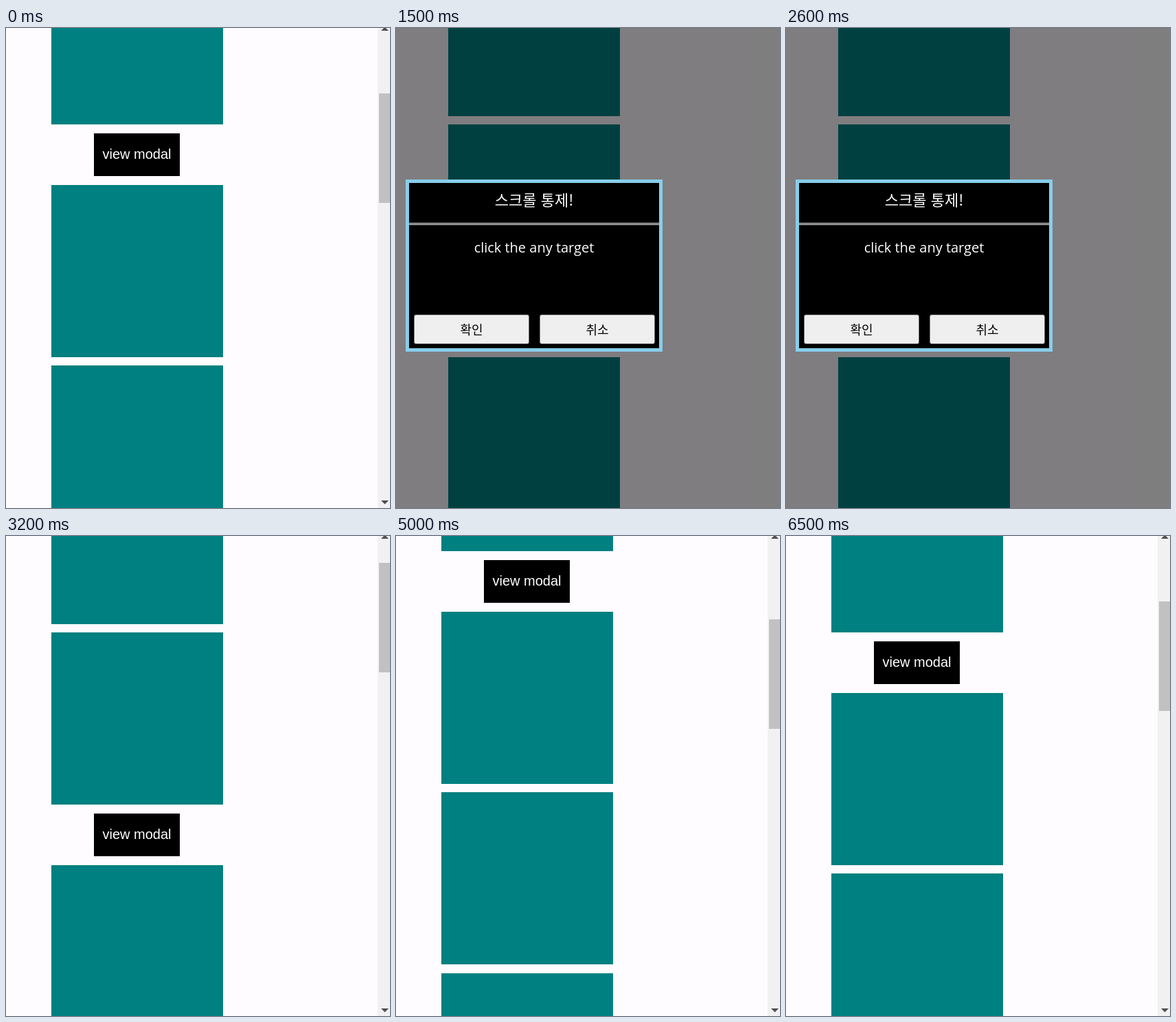
These frames come from a looping animation (559 px wide and 697 px high, 7.4 s). An HTML page:

```html
<!DOCTYPE html>
<html lang="ko">
<head>
<meta charset="utf-8">
<title>Modal scroll lock</title>
<style>
  html, body { margin: 0; width: 100%; height: 100%; overflow: hidden; background: #fffcff; }
  div { position: absolute; box-sizing: border-box; }
  #stage { left: 0; top: 0; width: 559px; height: 697px; overflow: hidden; background: #fffcff; }
  #page { left: 0; top: 0; }
  .box { left: 66px; width: 250px; height: 250px; background: #008080; }
  #open {
    left: 128px; top: 153px; width: 125px; height: 62px; background: #000; color: #fff;
    font: 20px/60px "Liberation Sans", Arial, sans-serif; text-align: center; white-space: nowrap;
  }
  .locked .box { left: 76px; }
  .locked #open { left: 139px; }

  #bar { left: 541px; top: 0; width: 18px; height: 697px; background: #f1f1f1; }
  #thumb { left: 2px; top: 0; width: 16px; height: 159px; background: #c1c1c1; }
  #bar svg { position: absolute; left: 0; top: 0; fill: #505050; }
  .locked #bar { display: none; }

  #overlay { inset: 0; background: rgba(0, 0, 0, .5); display: none; }
  .locked #overlay { display: block; }
  #modal {
    left: 14px; top: 220px; width: 374px; height: 250px;
    border: 5px solid #87ceeb; background: #000; color: #fff; text-align: center; white-space: nowrap;
  }
  #title {
    left: 0; top: 0; width: 364px; height: 61px; border-bottom: 3px double #fff;
    font: 22px/46px "Noto Sans CJK KR", "Noto Sans CJK", sans-serif;
  }
  #message { left: 0; top: 79px; width: 364px; font: 20px/30px "Open Sans", sans-serif; }
  .choice {
    top: 191px; width: 168px; height: 43px; border: 1px solid #767676; border-radius: 3px;
    background: #efefef; color: #000;
    font: 18px/41px "Noto Sans CJK KR", "Noto Sans CJK", sans-serif;
  }
  #ok { left: 7px; }
  #cancel { left: 190px; }
  .choice.hover { background: #e5e5e5; }
  .choice.active { background: #f5f5f5; }
</style>
</head>
<body>
<div id="stage">
  <div id="page"><div id="open">view modal</div></div>
  <div id="bar">
    <div id="thumb"></div>
    <svg width="18" height="697"><path d="M5 4L10.5 -1.5L16 4ZM5 686H16L10.5 691.5Z"/></svg>
  </div>
  <div id="overlay">
    <div id="modal">
      <div id="title">스크롤 통제!</div>
      <div id="message">click the any target</div>
      <div class="choice" id="ok">확인</div>
      <div class="choice" id="cancel">취소</div>
    </div>
  </div>
</div>
<script>
  const LOOP = 7400;
  const BOX_TOPS = [-372, -110, 228, 490, 753];
  const $ = id => document.getElementById(id);

  // [time, page offset]
  const scrolls = [
    [0, 0], [700, 80], [800, 165], [900, 250],
    [3500, 165], [3600, 80], [3700, 0],
    [4900, -35], [5000, -118], [5100, -201], [5200, -250], [5300, -125], [5400, 0]
  ];
  // [time, modal open, ok state, cancel state]
  const modals = [
    [0, false],
    [1400, true], [1700, true, '', 'hover'], [1800, true, 'hover', ''], [2100, false],
    [2600, true], [2800, true, '', 'hover'], [3000, true, '', 'active'], [3200, false],
    [4000, true], [4300, true, 'hover', ''], [4600, false],
    [5800, true], [6500, false]
  ];

  for (const top of BOX_TOPS) {
    const box = document.createElement('div');
    box.className = 'box';
    box.style.top = top + 'px';
    $('page').append(box);
  }

  const stepAt = (steps, time) => steps.findLast(step => step[0] <= time);
  const moveY = (id, y) => { $(id).style.transform = `translateY(${y}px)`; };

  function draw(time) {
    const [, offset] = stepAt(scrolls, time);
    const [, open, ok = '', cancel = ''] = stepAt(modals, time);
    moveY('page', offset);
    moveY('thumb', Math.round(95 - offset * 0.224));
    $('stage').className = open ? 'locked' : '';
    $('ok').className = 'choice ' + ok;
    $('cancel').className = 'choice ' + cancel;
  }

  const start = performance.now();
  function tick() {
    draw((performance.now() - start) % LOOP);
    requestAnimationFrame(tick);
  }
  tick();
</script>
</body>
</html>
```
